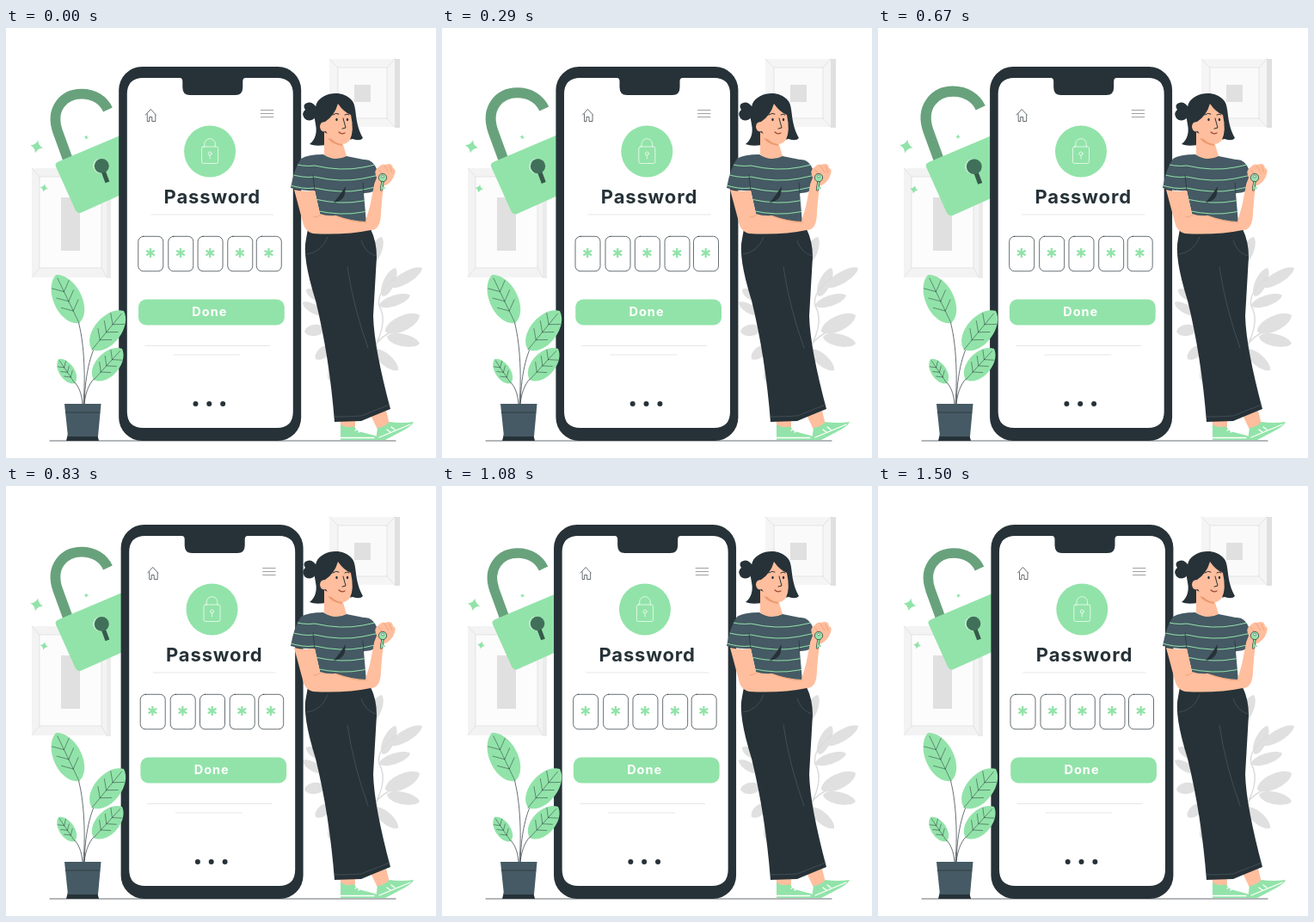
An HTML page that plays this animation: 500 px wide and 500 px high, repeating every 1.54 s.

```html
<!DOCTYPE html>
<html lang="en">
<head>
<meta charset="utf-8">
<style>
html, body { margin: 0; width: 100%; height: 100%; overflow: hidden; background: #fff; }
svg { display: block; width: 100%; height: 100%; }
text { font-family: Inter, "Open Sans", sans-serif; font-weight: 700; text-anchor: middle; }
.dark { fill: #263238; }
.green { fill: #92e3a9; }
.skin { fill: #ffbe9d; }
.shirt { fill: #455a64; }
.grey { fill: #e0e0e0; }
.line { fill: none; stroke: #263238; stroke-width: .7; stroke-linecap: round; stroke-linejoin: round; }
.pale { stroke: #dcdcdc; }
.white { stroke: #fff; }
.mint { stroke: #92e3a9; }
</style>
</head>
<body>
<svg viewBox="0 0 500 500">
  <defs>
    <path id="tee" d="M369 147Q351 147 343 152Q335 163 331 186Q345 190 359 189L366 220Q395 222 419 227L416 192Q424 192 429 189Q432 176 432 166Q427 152 416 153L396 149Q382 156 369 147Z"/>
    <clipPath id="teeClip"><use href="#tee"/></clipPath>
  </defs>

  <g id="frames">
    <path fill="#e0e0e0" d="M452 36h6v80h-6z"/>
    <path fill="#f5f5f5" d="M376 36h76v79h-76z"/>
    <path fill="#fafafa" d="M386 46h57v59h-57z"/>
    <path class="line pale" stroke-width=".5" d="M376 36l10 10h57v59h-57V46M452 36l-9 10M376 115l10-10M452 115l-9-10"/>
    <path class="grey" d="M405 66h19v20h-19z"/>
    <path fill="#ebebeb" d="M117 163h5v128h-5z"/>
    <path fill="#f3f3f3" d="M30 163h87v127H30z"/>
    <path fill="#fcfcfc" d="M39 173h72v106H39z"/>
    <path class="line pale" d="M30 163l9 10h72v106H39V173M30 290l9-11M117 290l-6-11"/>
    <path class="grey" d="M64 197h22v62H64z"/>
  </g>
  <g id="shade" class="grey"></g>
  <path class="line" d="M51 480H453"/>

  <g id="padlock">
    <path fill="none" stroke="#68a27c" stroke-width="11.5" d="M73 154L61 121C52 95 68 78 88 78C102 78 113 85 118 96"/>
    <path class="green" d="M62 155L140 122Q144 121 146 125L167 172Q168 177 164 179L88 213Q84 215 81 210L59 161Q57 157 62 155Z"/>
    <circle cx="109.500" cy="160" r="8.500" fill="#c4f0d0"/>
    <path fill="none" stroke="#37594b" stroke-width="5" d="M111 161L117.500 178.500"/>
    <circle cx="111" cy="160" r="8.300" fill="#41705a"/>
    <g id="sparkles" class="green"></g>
  </g>

  <g id="phone">
    <rect class="dark" x="131.400" y="45" width="212" height="435" rx="27"/>
    <path fill="#fff" d="M160 58H202Q205.500 58 205.500 62V69Q205.500 78 214 78H267Q275.500 78 275.500 69V62Q275.500 58 279 58H315Q334 58 334 77V446Q334 465 315 465H160Q141 465 141 446V77Q141 58 160 58Z"/>
    <path class="line" stroke-width=".6" d="M162.500 101L168.500 94.500L174.500 101M164.500 100V108.500H167V103.500H170V108.500H174V101"/>
    <path class="line" stroke="#888" style="stroke:#777" d="M296.500 95.500h14.500m-14.500 4h14.500m-14.500 4h14.500"/>
    <circle class="green" cx="237.300" cy="143.500" r="30"/>
    <g class="line white">
      <rect x="227.800" y="138" width="19" height="19.500" rx="2"/>
      <path d="M231 138v-3a6.300 6.300 0 0 1 12.600 0v3M237.300 148v4"/>
      <circle cx="237.300" cy="146" r="2"/>
    </g>
    <text class="dark" x="240" y="204" font-size="22" letter-spacing=".85">Password</text>
    <path class="line pale" d="M169 217H311"/>
    <g id="boxes"></g>
    <rect class="green" x="154.200" y="315.500" width="169.800" height="30" rx="9"/>
    <text x="237" y="334.700" font-size="14.500" letter-spacing="1" fill="#fff">Done</text>
    <path class="line pale" d="M162 369.500H307M195 380H272"/>
    <g class="dark"><circle cx="220.700" cy="437" r="3"/><circle cx="236.500" cy="437" r="3"/><circle cx="252.400" cy="437" r="3"/></g>
  </g>

  <g id="plant">
    <path class="line" d="M90 437C93 400 90 362 84 341M91 437C92 405 97 385 103 371M91 437C93 420 98 412 104 406M89 437C88 424 84 416 79 411"/>
    <g id="leaves"></g>
    <path class="dark" d="M72 472h34l2 8H70z"/>
    <path class="shirt" d="M68 437h42.500l-3.500 38H72z"/>
    <path class="line" d="M69 447h40"/>
  </g>

  <g id="woman">
    <path class="skin" d="M388 452h18v18h-16zM424 450l18-5 5 20-14 4z"/>
    <path class="green" d="M389 461Q395 466 404 463L410 469L429 474Q433 476 432 479H389ZM432 465Q440 464 446 458Q460 460 474 458Q472 463 460 469L441 479H430Z"/>
    <path class="line white" style="stroke-width:1.300" d="M389 476.500H428M434 476L470 461M406 468l4-3m0 5l4-3M443 467l4 3m1-6l4 3"/>
    <path class="dark" d="M351 234H424Q431 248 431 266L427 335Q428 372 447 443Q432 449 413 457L382 458Q376 382 360 317Q344 266 349 245Z"/>
    <path class="line" style="stroke:#5a6970;stroke-width:.5" d="M397 278Q404 325 421 372M350 263q17-2 24-20M430 265q-13-4-17-18M382 452q17 0 31-1l33-13"/>
    <path class="dark" d="M361 88C367 75 391 71 402 84C409 92 404 108 415 128Q412 132 403 129L372 136Q359 138 353 135Q363 127 360 112Q357 99 361 88Z"/>
    <path class="dark" d="M362 94Q356 83 348 88Q345 91 348 95Q343 99 347 105Q353 111 361 103Z"/>
    <path class="skin" d="M370 121V147Q380 157 396 149L391 132Z"/>
    <path fill="#eb996e" d="M374 128Q380 136 391 137L390 132Z"/>
    <path class="skin" d="M371 109Q382 102 386 88Q393 98 401 101Q405 120 400 130Q393 139 382 132Q375 127 372 120Q366 122 365 115Q365 109 371 109Z"/>
    <path class="line" style="stroke-width:1" d="M380 101q4-3 7-1M394 101q3-2 5 0M392 105l3 11-4 1"/>
    <path class="line" style="stroke:#9a4a3a;stroke-width:1.200" d="M387 121q3 3 7 1"/>
    <g class="dark"><ellipse cx="384.500" cy="106.500" rx="1.200" ry="1.700"/><ellipse cx="397" cy="106.500" rx="1.200" ry="1.700"/></g>
    <use href="#tee" class="shirt"/>
    <g id="stripes" class="line mint" clip-path="url(#teeClip)"></g>
    <path class="dark" d="M395 184Q388 195 381 203Q392 201 394 193Z"/>
    <path class="line" d="M359 189L357 171M416 192L415 180"/>
    <path class="skin" d="M335 188Q347 191 359 189L365 216Q373 219 383 218Q404 225 418 225Q424 207 427 188Q428 180 431 174Q427 165 433 162Q437 157 441 159Q449 156 450 163Q454 164 452 170Q449 180 439 184Q437 199 436 214Q436 235 424 235Q395 241 357 239Q349 237 346 229Z"/>
    <path class="line" style="stroke:#eb996e" d="M366 217Q361 221 358 220M434 165l5 7M440 160l5 8M446 161l3 7M383 218q20 8 36 8"/>
    <path class="line" style="stroke-width:3.200" d="M438 178L436.500 188"/>
    <path class="line mint" style="stroke-width:2" d="M438 178L436.500 188M437 186h3"/>
    <circle class="green" cx="438" cy="174" r="4.700" stroke="#263238" stroke-width=".7"/>
    <circle cx="438" cy="172.500" r="1.400" fill="#fff" stroke="#263238" stroke-width=".5"/>
  </g>
</svg>
<script>
const el = id => document.getElementById(id);
const add = (id, markup) => el(id).insertAdjacentHTML('beforeend', markup);

// Almond shape from base to tip; bulge is the full width
function leafPath(x, y, tx, ty, bulge) {
  const k = bulge * .68 / Math.hypot(tx - x, ty - y);
  const nx = -(ty - y) * k, ny = (tx - x) * k;
  const at = (f, s) => `${x + (tx - x) * f + nx * s} ${y + (ty - y) * f + ny * s}`;
  return `M${x} ${y}C${at(.1, 1)} ${at(.85, 1)} ${tx} ${ty}C${at(.85, -1)} ${at(.1, -1)} ${x} ${y}Z`;
}

function veins(x, y, tx, ty, bulge) {
  const dx = tx - x, dy = ty - y, k = bulge * .34 / Math.hypot(dx, dy);
  let d = `M${x} ${y}L${x + dx * .93} ${y + dy * .93}`;
  for (const f of [.25, .45, .65]) for (const s of [-1, 1])
    d += `M${x + dx * f} ${y + dy * f}l${dx * .15 - dy * k * s} ${dy * .15 + dx * k * s}`;
  return d;
}

for (const leaf of [[85, 343, 58, 287, 32], [100, 374, 137, 329, 30], [102, 409, 135, 373, 26], [80, 413, 61, 385, 17]])
  add('leaves', `<path class="green" d="${leafPath(...leaf)}"/><path class="line" style="stroke-width:.5" d="${veins(...leaf)}"/>`);

for (const leaf of [
  [423, 276, 437, 243, 13], [438, 312, 453, 279, 13], [447, 301, 484, 279, 13], [434, 323, 470, 311, 12],
  [441, 353, 481, 334, 17], [443, 359, 481, 367, 14], [428, 374, 456, 398, 13], [367, 316, 349, 304, 10],
  [368, 333, 345, 319, 10], [370, 350, 347, 353, 13], [377, 370, 360, 385, 12], [386, 386, 376, 410, 11]
]) add('shade', `<path d="${leafPath(...leaf)}"/>`);
add('shade', '<path class="line pale" style="stroke-width:1.500" d="M420 385Q447 345 434 323Q430 308 453 290M425 375Q432 362 445 355"/>');

for (const [x, y, r] of [[37, 138, 7.5], [93.5, 127.5, 2.6], [45.5, 185, 4.7]])
  add('sparkles', `<path transform="translate(${x} ${y}) rotate(12) scale(${r})" d="M0-1Q.2-.2 1 0Q.2 .2 0 1Q-.2 .2-1 0Q-.2-.2 0-1Z"/>`);

for (const x of [154, 189, 223.3, 258, 291.5])
  add('boxes', `<rect class="line" x="${x}" y="242.300" width="29" height="40.500" rx="6"/>
    <path class="line mint" style="stroke-width:2.300;stroke-linecap:butt" transform="translate(${x + 14.2} 261.500)" d="M0-5.500V5.500M-4.800-2.800L4.800 2.800M-4.800 2.800L4.800-2.800"/>`);

for (let y = 160; y < 225; y += 13)
  add('stripes', `<path style="stroke-width:1" d="M328 ${y - 4}Q345 ${y + 2} 359 ${y}Q390 ${y + 7} 415 ${y + 2}L434 ${y - 2}"/>`);

const LOOP = 1540, FPS = 24, LEAD = 33;
const shake = [0, -1, 2, -4, 4, -4, 4, -4, 2, -1, 0];
const beat = [1, 1.1, 1.05, 1, 1, 1.1, 1, 1, 1, 1, 1];

// Linear keyframes, one every 150 ms
function sample(keys, ms) {
  const p = Math.min(ms / 150, keys.length - 1), i = Math.min(Math.floor(p), keys.length - 2);
  return keys[i] + (keys[i + 1] - keys[i]) * (p - i);
}

const start = performance.now();
function draw() {
  const t = (performance.now() - start) % LOOP;
  const ms = Math.floor((t + 5) * FPS / 1000) * 1000 / FPS + LEAD;
  el('phone').setAttribute('transform', `translate(${sample(shake, ms)} 0)`);
  el('padlock').setAttribute('transform', `translate(99 143) scale(${sample(beat, ms)}) translate(-99 -143)`);
  requestAnimationFrame(draw);
}
draw();
</script>
</body>
</html>
```
